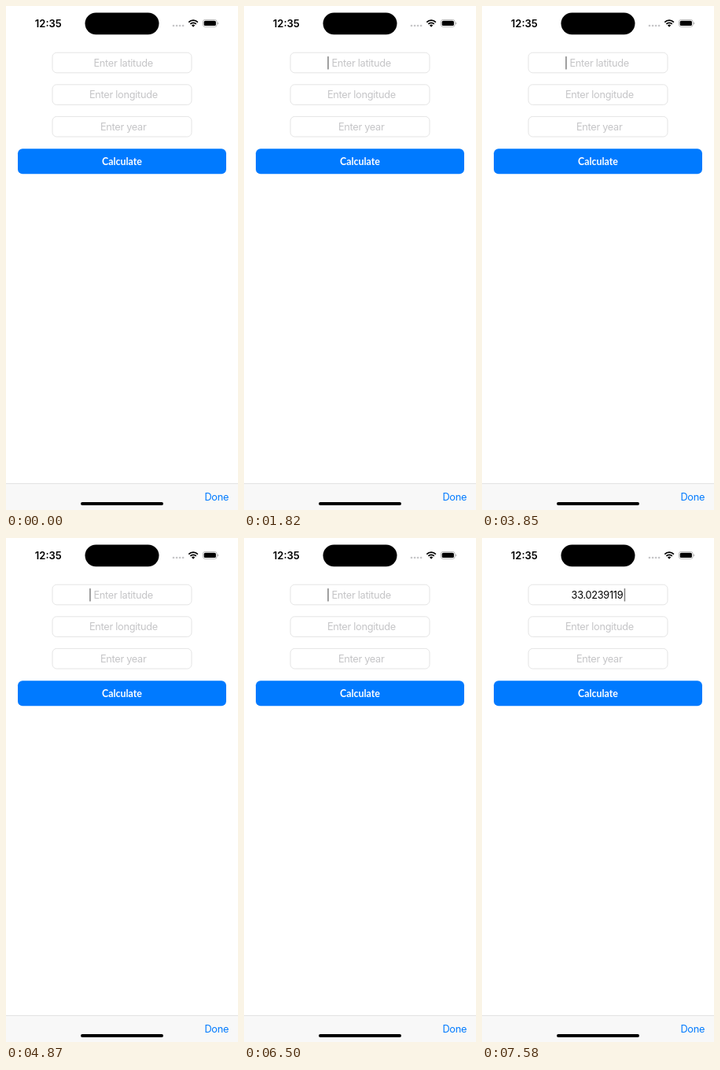
Write an HTML page that moves like this. It is 295 by 640 pixels and loops after 8000 ms.

```html
<!DOCTYPE html>
<html lang="en">
<head>
<meta charset="utf-8">
<title>Calculator form</title>
<style>
  html, body { margin: 0; width: 100%; height: 100%; overflow: hidden; background: #fff; }
  svg { display: block; width: 295px; height: 640px; }
  text { font: 12.75px Inter, sans-serif; letter-spacing: -.29px; }
  .hint { fill: #c5c5c7; text-anchor: middle; }
  .field { fill: #fff; stroke: #dedede; stroke-width: .8; }
</style>
</head>
<body>
<svg viewBox="0 0 295 640">
  <rect width="295" height="640" fill="#fff"/>

  <!-- status bar -->
  <text x="36.8" y="26.5" style="font-size:13px;font-weight:600;letter-spacing:0">12:35</text>
  <rect x="100.5" y="8.5" width="94" height="27.7" rx="13.85"/>
  <g fill="#c6c6c8">
    <circle cx="213" cy="25" r="1.35"/>
    <circle cx="217.1" cy="25" r="1.35"/>
    <circle cx="221.1" cy="25" r="1.35"/>
    <circle cx="225.1" cy="25" r="1.35"/>
  </g>
  <g fill="none" stroke="#000" stroke-width="1.7">
    <path d="M232.3 20.6a8.2 8.2 0 0 1 11.6 0"/>
    <path d="M234.4 22.9a5.2 5.2 0 0 1 7.4 0"/>
  </g>
  <path d="M238.1 26.7l-2.1-2.1a3 3 0 0 1 4.2 0z"/>
  <rect x="250.4" y="17.4" width="17.8" height="9" rx="2.8" fill="none" stroke="#a8a8a8" stroke-width=".8"/>
  <rect x="251.7" y="18.7" width="15.2" height="6.4" rx="1.7"/>
  <path d="M269.2 20.4q1.1.4 1.1 1.5t-1.1 1.5z" fill="#a8a8a8"/>

  <!-- form -->
  <rect class="field" x="59" y="59.2" width="177" height="25.6" rx="5.5"/>
  <rect class="field" x="59" y="99.8" width="177" height="25.6" rx="5.5"/>
  <rect class="field" x="59" y="140.4" width="177" height="25.6" rx="5.5"/>
  <text class="hint" id="hint" x="149.2" y="76.8">Enter latitude</text>
  <text class="hint" x="149.4" y="117.4">Enter longitude</text>
  <text class="hint" x="149.2" y="158">Enter year</text>
  <text id="value" x="113.6" y="76.8">33.0239119</text>
  <text id="menu" x="107" y="96.6" fill="#999" text-anchor="middle" style="font-size:10px">Paste</text>
  <rect id="caret" y="64" width="1.5" height="16.5" rx=".5"/>
  <rect x="15" y="181.3" width="265" height="32" rx="6" fill="#007aff"/>
  <text x="147.5" y="201.9" fill="#fff" text-anchor="middle"
    style="font:700 12.4px Lato, sans-serif;letter-spacing:0">Calculate</text>

  <!-- keyboard toolbar -->
  <rect y="606" width="295" height="34" fill="#f8f8f8"/>
  <rect y="606" width="295" height="1" fill="#e2e2e2"/>
  <text x="252.4" y="628" fill="#007aff">Done</text>
  <rect x="95" y="630" width="105" height="4" rx="2"/>
</svg>
<script>
const LOOP = 8000, PASTE = 6610;
const OFF = 0, DIM = .5, ON = .66;
const $ = id => document.getElementById(id);
const hint = $('hint'), value = $('value'), menu = $('menu'), caret = $('caret');

// [time, caret opacity]
const blink = [[0, OFF]];
for (const [rise, fall] of [[150, 810], [1160, 1820], [2180, 2840], [3200, 3850], [4210, 4870], [5220, 5880]]) {
  blink.push([rise, DIM], [rise + 120, ON], [fall, DIM], [fall + 115, OFF]);
}
blink.push([6240, ON], [6500, DIM], [PASTE, ON], [7180, OFF], [7460, .3], [7580, DIM]);

const at = (steps, t) => steps.reduce((v, [time, next]) => t >= time ? next : v, 0);

function draw(t) {
  const pasted = t >= PASTE;
  hint.setAttribute('opacity', pasted ? 0 : 1);
  value.setAttribute('opacity', pasted ? 1 : 0);
  menu.setAttribute('opacity', at([[PASTE, .45], [6720, .2], [6830, 0]], t));
  caret.setAttribute('x', pasted ? 180.7 : 106.2);
  caret.setAttribute('opacity', at(blink, t));
}

const start = performance.now();
function tick() {
  draw((performance.now() - start) % LOOP);
  requestAnimationFrame(tick);
}
tick();
</script>
</body>
</html>
```
